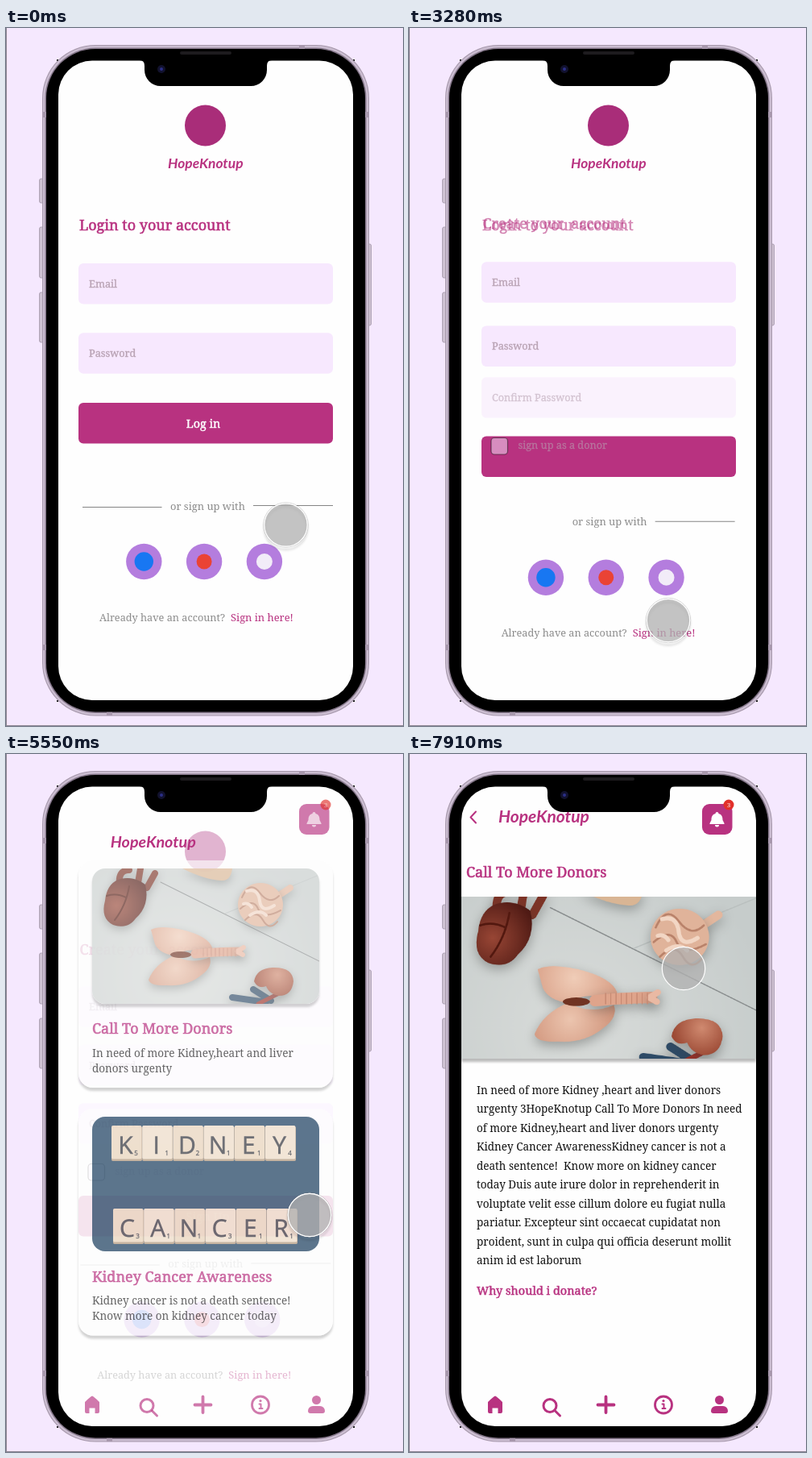
Animation, 493 px wide and 866 px high, one loop 8000 ms. Source, as an HTML page with a canvas:

```html
<!DOCTYPE html>
<html lang="en">
<head>
<meta charset="utf-8">
<title>Donor app prototype</title>
<style>
  html, body { margin: 0; width: 100%; height: 100%; overflow: hidden; background: #f5e8fe; }
  canvas { display: block; width: 493px; height: 866px; }
</style>
</head>
<body>
<canvas id="stage"></canvas>
<script>
const W = 493, H = 866, LOOP = 8000;
const PINK = '#b83280', FIELD = '#f7e8fe', HINT = '#b9a3b4', GREY = '#8b8b8b', PAPER = '#fefefe';
const SERIF = '"Noto Serif", serif', SANS = '"Open Sans", sans-serif';
const BRAND = 'HopeKnotup';
const ARTICLE = [
  'In need of more Kidney ,heart and liver donors',
  'urgenty 3' + BRAND + ' Call To More Donors In need',
  'of more Kidney,heart and liver donors urgenty',
  'Kidney Cancer AwarenessKidney cancer is not a',
  'death sentence!  Know more on kidney cancer',
  'today Duis aute irure dolor in reprehenderit in',
  'voluptate velit esse cillum dolore eu fugiat nulla',
  'pariatur. Excepteur sint occaecat cupidatat non',
  'proident, sunt in culpa qui officia deserunt mollit',
  'anim id est laborum'
];

const stage = document.getElementById('stage');
const dpr = window.devicePixelRatio || 1;
stage.width = W * dpr;
stage.height = H * dpr;
let c = stage.getContext('2d');

// ---- helpers ----
const mix = (a, b, p) => a + (b - a) * p;
const smooth = p => p * p * (3 - 2 * p);

// Progress in n held steps: the first lands at time a, the last at time b.
const steps = (t, a, b, n) =>
  t < a ? 0 : Math.min(1, (Math.floor((t - a) / (b - a) * (n - 1) + 0.05) + 1) / n);

function fade(alpha, draw) {
  if (alpha <= 0) return;
  c.save();
  c.globalAlpha *= alpha;
  draw();
  c.restore();
}

function box(x, y, w, h, r, fill, stroke) {
  c.beginPath();
  c.roundRect(x, y, w, h, r);
  if (fill) { c.fillStyle = fill; c.fill(); }
  if (stroke) { c.strokeStyle = stroke; c.stroke(); }
}

function disc(x, y, r, fill, ry = r, turn = 0) {
  c.beginPath();
  c.ellipse(x, y, r, ry, turn, 0, 7);
  c.fillStyle = fill;
  c.fill();
}

function ring(x, y, r, color, width) {
  c.beginPath();
  c.arc(x, y, r, 0, 7);
  c.strokeStyle = color;
  c.lineWidth = width;
  c.stroke();
}

function shape(d, fill) {
  c.fillStyle = fill;
  c.fill(new Path2D(d));
}

function stroke(d, color, width) {
  c.strokeStyle = color;
  c.lineWidth = width;
  c.stroke(new Path2D(d));
}

function text(str, x, y, size, color, weight = 0, align = 'left', font = SERIF, style = '') {
  c.font = `${style} ${size}px ${font}`;
  c.textAlign = align;
  c.fillStyle = c.strokeStyle = color;
  c.fillText(str, x, y);
  if (weight) { c.lineWidth = weight; c.strokeText(str, x, y); }
}

const heading = (str, x, y) => text(str, x, y, 18, PINK, 0.6);

function shadowed(color, dy, blur, draw) {
  c.save();
  c.shadowColor = color;
  c.shadowOffsetY = dy;
  c.shadowBlur = blur;
  draw();
  c.restore();
}

const lifted = draw => shadowed('rgba(0,0,0,.27)', 4 * dpr, 3 * dpr, draw);

// A box whose shadow stays outside it, so that it can be translucent.
function card(x, y, w, h, r) {
  c.save();
  c.beginPath();
  c.rect(0, 0, W, H);
  c.roundRect(x, y, w, h, r);
  c.clip('evenodd');
  lifted(() => box(x, y, w, h, r, PAPER));
  c.restore();
  box(x, y, w, h, r, PAPER);
}

// ---- pictures, painted once ----
const PIC_W = 282, PIC_H = 168;

function paint(draw) {
  const pic = document.createElement('canvas'), main = c;
  pic.width = PIC_W * 2;
  pic.height = PIC_H * 2;
  c = pic.getContext('2d');
  c.scale(2, 2);
  c.lineCap = 'round';
  draw();
  c = main;
  return pic;
}

function glow(x, y, r, inner, outer) {
  const g = c.createRadialGradient(x, y, 0, x, y, r);
  g.addColorStop(0, inner);
  g.addColorStop(1, outer);
  return g;
}

const organs = paint(() => {
  const soft = draw => shadowed('rgba(60,62,60,.4)', 8, 22, draw);
  c.fillStyle = glow(110, 130, 190, '#d9dcda', '#c6cccb');
  c.fillRect(0, 0, PIC_W, PIC_H);
  stroke('M85 17L282 115', '#85898a', 1);
  stroke('M165 56L282 8', '#b9bfbe', 1);
  // heart
  soft(() => {
    stroke('M34 20Q32 2 46 2M60 0L56 24M78 6L68 24', '#7c3326', 8);
    shape('M16 40Q18 20 32 14Q50 8 66 20Q72 46 54 62Q44 76 26 70Q10 62 16 40Z',
      glow(30, 46, 42, '#984635', '#4f1a14'));
  });
  stroke('M46 22Q42 46 28 64M18 34Q30 30 42 36', '#52180f', 2);
  // lungs and windpipe
  soft(() => {
    shape('M73 76Q84 70 112 76Q144 84 149 98L146 106Q120 96 102 108Q84 106 78 94Z',
      glow(108, 84, 46, '#f0cdb8', '#d79c83'));
    shape('M70 138Q78 118 102 108Q124 120 146 110Q150 122 136 132Q118 147 92 145Q72 146 70 138Z',
      glow(104, 124, 46, '#ecc5af', '#cf9279'));
    stroke('M128 106Q160 103 182 103', '#dfa48b', 11);
    stroke('M180 103L188 98M180 103L187 107', '#e9b9a3', 6);
  });
  disc(110, 107, 13, '#703322', 4);
  for (let x = 138; x < 180; x += 5) stroke(`M${x} 99V109`, '#c78a73', 1);
  // bowel
  soft(() => {
    stroke('M228 36L246 24', '#e3b79e', 8);
    disc(209, 45, 28, '#e0b39a', 27);
  });
  stroke('M186 36Q196 14 208 30T232 34M184 50Q200 36 206 50T234 52M190 64Q204 50 212 64T230 66', '#b9826a', 2);
  stroke('M192 28Q206 24 208 40T226 46M196 58Q208 50 216 58M188 44Q194 42 198 48', '#f2d6c4', 4);
  // cropped piece at the top
  soft(() => shape('M112 0H174Q172 16 160 15Q140 14 112 0Z', '#d9b594'));
  // kidney with vessels
  soft(() => {
    stroke('M174 160L216 166M200 150L222 164', '#2d4a66', 8);
    stroke('M206 168L238 152', '#9b2f26', 5);
    shape('M201 140Q204 124 224 123Q249 122 250 140Q248 158 232 158Q220 156 216 146Q206 150 201 140Z',
      glow(230, 132, 28, '#d08a70', '#9c4a35'));
  });
});

const tiles = paint(() => {
  c.fillStyle = '#062c50';
  c.fillRect(0, 0, PIC_W, PIC_H);
  const row = (letters, points, x, y) => [...letters].forEach((letter, i) => {
    const left = x + i * 38.2;
    box(left, y + 1, 38, 43, 2, '#a98d70');
    box(left, y, 37.4, 41.5, 2, i % 2 ? '#ecd9c1' : '#e6cfb4');
    text(letter, left + 17.5, y + 35, 30, '#22242c', 0.5, 'center', SANS);
    text(points[i], left + 30.5, y + 37, 8, '#22242c', 0.3, 'center', SANS);
  });
  row('KIDNEY', '512114', 24, 11.5);
  row('CANCER', '311311', 26, 114.5);
});

// Fills a rounded box with a picture, cropped evenly to keep its proportions.
function photo(pic, x, y, w, h, r) {
  const k = Math.max(w / PIC_W, h / PIC_H), pw = PIC_W * k, ph = PIC_H * k;
  c.save();
  c.beginPath();
  c.roundRect(x, y, w, h, r);
  c.clip();
  c.drawImage(pic, x + (w - pw) / 2, y + (h - ph) / 2, pw, ph);
  c.restore();
}

// ---- screens ----
function field(label, y) {
  box(90, y, 316, 50.5, 6, FIELD);
  text(label, 103, y + 30, 12.7, HINT, 0.35);
}

function form(s) {
  disc(247.5, 121, 25.5, '#a92d79');
  fade(1 - s, () => heading('Login to your account', 91, 250.5));
  fade(s, () => heading('Create your  account', 91.5, 248.5));
  field('Email', mix(292, 288.3, s));
  field('Password', mix(378.3, 360.5, s));
  const y = mix(465, 548, s);
  box(90, y, 316, 50.5, 6, PINK);
  fade(1 - 2 * s, () => text('Log in', 245, y + 31, 14.4, '#fff', 0.4, 'center'));
  fade(2 * s - 1, () => text('Sign Up', 250.5, y + 31, 14.9, '#fff', 0.4, 'center'));
  fade(s, () => {
    field('Confirm Password', 433.3);
    c.lineWidth = 1.2;
    box(102, 508.5, 20.5, 20.5, 4, FIELD, '#111');
    text('sign up as a donor', 135.5, 522, 12.7, HINT, 0.35);
  });
  c.save();
  c.translate(-2.7 * s, 39.5 * s);
  fade(Math.abs(1 - 2 * s), () => stroke('M95 594.5H193.5', '#858585', 1));
  stroke('M307 592.5H406', '#858585', 1);
  text('or sign up with', 204, 597.5, 12.9, GREY);
  [['#1877f2', 11.7], ['#ea4335', 9.5], ['#f2ecf8', 10]].forEach(([color, r], i) => {
    const x = 171.3 + i * 74.8;
    disc(x, 662, 22.2, '#b47dde');
    disc(x, 662, r, color);
  });
  text('Already have an account?', 116, 735.5, 12.7, GREY);
  text('Sign in here!', 279, 735.5, 12.9, PINK);
  c.restore();
}

function note(lines, y) {
  lines.forEach((line, i) => text(line, 107, y + i * 19, 13.5, '#111'));
}

function feed() {
  card(107, 142, PIC_W, PIC_H, 16);
  photo(organs, 107, 142, PIC_W, PIC_H, 16);
  note(['In need of more Kidney,heart and liver', 'donors urgenty'], 375.5);
  card(90, 440, 316, 281.5, 18);
  photo(tiles, 107, 450, PIC_W, 167, 16);
  heading('Kidney Cancer Awareness', 107, 655);
  note(['Kidney cancer is not a death sentence!', 'Know more on kidney cancer today'], 683);
}

// The first card grows into the picture at the head of the article.
function leadCard(a) {
  const frame = [mix(90, 65, a), mix(132, 177, a), mix(316, 366, a), mix(282, 201, a), mix(18, 0, a)];
  card(...frame);
  fade(a ** 1.5, () => photo(organs, ...frame));
}

function article() {
  c.lineCap = 'round';
  stroke('M83 71.5L76.5 78.5L83 85.5', PINK, 2);
  ARTICLE.forEach((line, i) => text(line, 84, 421.5 + i * 23.55, 13.5, '#111'));
  text('Why should i donate?', 84, 670.5, 14.5, PINK, 0.5);
}

function toolbar() {
  box(364, 62, 37.5, 38, 9, PINK);
  shape('M382.5 72a2 2 0 0 1 2 2c4 1 5 4 5 8l2 4v1h-18v-1l2-4c0-4 1-7 5-8a2 2 0 0 1 2-2zM380 88h5a2.5 2.5 0 0 1-5 0z', '#fff');
  disc(397, 63, 6.5, '#e2302a');
  text('3', 397, 66, 8, '#fff', 0, 'center', SANS);

  c.lineCap = 'round';
  shape('M107 796.5Q108.5 796.5 116 804V816Q116 818 114 818H110.5V811.5H103.5V818H100Q98 818 98 816V804Q105.5 796.5 107 796.5Z', PINK);
  ring(175, 808.5, 8, PINK, 3);
  stroke('M181.5 815L187.5 821', PINK, 3);
  stroke('M244.5 797.5V817M234.5 807.5H254.5', PINK, 3.8);
  ring(316, 807.5, 10.5, PINK, 2.8);
  stroke('M314.5 806.5H316.5V812M314.5 812H318.5', PINK, 2);
  disc(316, 802.5, 1.6, PINK);
  disc(385.5, 801.5, 5.5, PINK);
  box(375, 809, 21, 9, [6, 6, 3, 3], PINK);
}

// ---- phone ----
function phone() {
  c.fillStyle = '#f5e8fe';
  c.fillRect(0, 0, W, H);
  c.fillStyle = '#8d8592';
  c.fillRect(0, 0, 1, H);
  c.fillRect(0, H - 1, W, 1);
  c.lineWidth = 0.8;
  for (const [x, y, h] of [[41.5, 187, 30], [41.5, 247, 63], [41.5, 328, 62], [448, 268, 101]])
    box(x, y, 5.5, h, 2, '#cfc2d3', '#a195a6');
  c.fillStyle = '#111';
  for (const x of [63, 431]) for (const y of [39, 834]) c.fillRect(x, y, 2, 2);
  box(45, 21, 406, 832.5, 66, '#a698ab');
  box(46, 22, 404, 830.5, 65, '#cbbdd1');
  box(48.5, 24.5, 399, 825.5, 62.5, '#85778a');
  c.fillStyle = '#a898ad';
  for (const x of [45, 446]) for (const y of [104, 765]) c.fillRect(x, y, 5, 7);
  c.fillRect(364, 21, 7, 5);
  c.fillRect(125, 848, 7, 5);
  box(50, 26, 396, 822.5, 61, '#000');
}

function notch() {
  shape('M166 40H330Q324 40 324 47V52A20 20 0 0 1 304 72H192A20 20 0 0 1 172 52V47Q172 40 166 40Z', '#000');
  box(216, 29, 64, 4, 2, '#1d1b1e');
  disc(193, 51, 5, '#12122e');
  disc(193, 51, 2, '#2b2f86');
}

// ---- pointer ----
// start, end, held steps, easing power, bend x/y, target x/y
const MOVES = [
  [150, 1160, 8, 2, 312, 549, 276, 482],
  [1570, 2580, 8, 2.5, 276, 607, 322, 735],
  [3970, 4830, 7, 1.8, 445, 660, 377, 572],
  [6260, 7090, 7, 4, 359, 419, 341, 266]
];

function pointer(t) {
  let x = 347.5, y = 616.5;
  for (const [a, b, n, power, bx, by, tx, ty] of MOVES) {
    const u = 1 - (1 - steps(t, a, b, n)) ** power;
    x = mix(mix(x, bx, u), mix(bx, tx, u), u);
    y = mix(mix(y, by, u), mix(by, ty, u), u);
  }
  const pressed = (t >= 1300 && t < 1570) || t >= 7370;
  if (!pressed) {
    lifted(() => ring(x, y, 26.7, '#fff', 1.2));
    ring(x, y, 27.7, 'rgba(110,110,110,.35)', 0.8);
  }
  disc(x, y, 27, 'rgba(178,178,178,.77)');
  ring(x, y, 26.7, '#fff', 1.2);
}

function draw(t) {
  const signUp = smooth(steps(t, 3140, 3560, 4));
  const home = smooth(steps(t, 5270, 5830, 5));
  const read = smooth(steps(t, 7630, 7910, 3));

  c.setTransform(dpr, 0, 0, dpr, 0, 0);
  c.lineJoin = 'round';
  c.lineCap = 'butt';
  phone();
  c.save();
  c.beginPath();
  c.roundRect(65, 40.5, 366, 793.5, 42);
  c.fillStyle = PAPER;
  c.fill();
  c.clip();
  fade(1 - home, () => form(signUp));
  fade(home, () => {
    leadCard(read);
    fade(1 - read, feed);
    heading('Call To More Donors', mix(107, 71, read), mix(347, 153, read));
    toolbar();
  });
  fade(read, article);
  text(BRAND, mix(201, 91, home) + 20 * read, mix(173.5, 85, home), mix(17.4, 21, home),
    PINK, 0, 'left', 'Lato, sans-serif', 'italic bold');
  c.restore();
  notch();
  pointer(t);
}

const begin = performance.now();
function tick() {
  draw((performance.now() - begin) % LOOP);
  requestAnimationFrame(tick);
}
tick();
</script>
</body>
</html>
```
